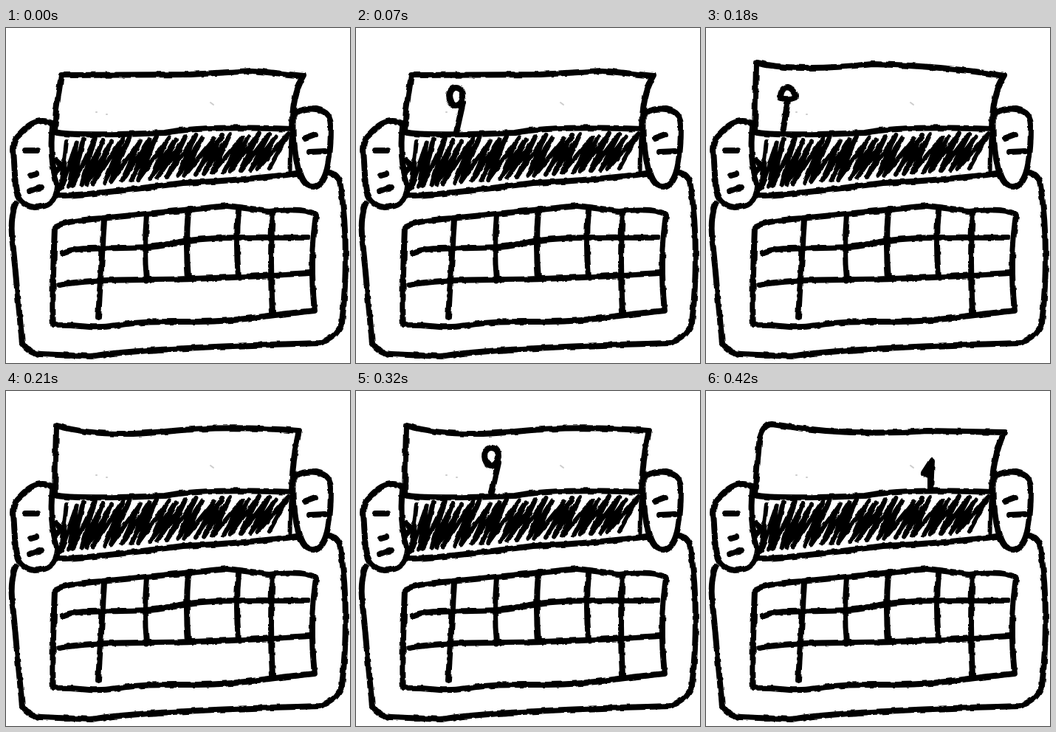
Recreate the animation shown at these times as an HTML page. Size 466 by 454 pixels, loop 490 ms.

```html
<!DOCTYPE html>
<html>
<head>
<meta charset="utf-8">
<title>Typewriter</title>
<style>
  html, body { margin: 0; height: 100%; overflow: hidden; background: #fff; }
  svg { display: block; width: 466px; height: 454px; }
  path { fill: none; stroke: #000; stroke-width: 8; stroke-linecap: round; stroke-linejoin: round; }
</style>
</head>
<body>
<svg viewBox="0 0 466 454">
  <filter id="ink" filterUnits="userSpaceOnUse" x="0" y="0" width="466" height="454" color-interpolation-filters="sRGB">
    <feTurbulence type="fractalNoise" baseFrequency=".08" numOctaves="2" seed="4"/>
    <feDisplacementMap in="SourceGraphic" scale="4" xChannelSelector="R" yChannelSelector="G"/>
  </filter>
  <g filter="url(#ink)">
    <!-- body -->
    <path stroke-width="8.5" d="M13 238Q4 262 10 300L22 428Q32 442 48 442L115 445Q180 434 425 427 448 420 455 400 466 300 453 212 450 198 438 196"/>
    <!-- knobs -->
    <path d="M64 130Q42 118 20 142 10 150 10 165L13 215Q16 240 38 243 68 243 70 215 58 175 63 135"/>
    <path d="M390 115C420 103 440 112 440 132S440 213 416 215 388 150 390 115"/>
    <path d="M26 166h17M34 200l7-2M31 221l17-5M405 149l14-5M411 168l21-1M68 180l7 7-8 9"/>
    <!-- roller -->
    <path d="M66 141Q90 147 215 142 270 132 387 137M71 227Q100 228 240 210 330 206 394 197"/>
    <path style="stroke-width: 5" d="M386 140L385 193"/>
    <path id="hatch" style="stroke-width: 6"/>
    <!-- keys -->
    <path d="M64 402Q62 385 66 270 75 262 130 258L300 241 355 248Q410 243 420 254 411 315 418 383C330 392 310 398 260 398S190 397 150 403 100 401 70 403"/>
    <path d="M76 305C100 293 180 303 220 293S320 283 408 284M72 348Q110 341 190 341T412 332"/>
    <path id="columns"/>
    <path id="paper"/>
    <path id="arm"/>
  </g>
  <path style="stroke: #ccc; stroke-width: 2" d="M277 101l4 3M122 114h1M136 117h1"/>
</svg>
<script>
const setPath = (id, d) => document.getElementById(id).setAttribute("d", d);

// scribble that leans further over as it crosses the roller
let scribble = "";
const turns = 25;
for (let i = 0; i < turns; i++) {
  const u = i / (turns - 1);
  const x = 82 + 298 * u + 2 * Math.sin(i * 2.4);
  const lean = 7 + 18 * Math.min(1, u * 5);
  scribble += `${i ? "L" : "M"}${x} ${153 - 9 * u + 3 * Math.sin(i * 1.7)}L${x - lean} ${216 - 26 * u}`;
}
setPath("hatch", scribble);

// the outer two columns run down past the space bar
const columns = [133, 191, 247, 315, 361].map((x, i) => {
  const top = Math.max(248, 272 - x / 10);
  const bottom = i == 0 ? 392 : i == 4 ? 385 : 351 - x * .045;
  return `M${x} ${top}Q${x - 4} ${(top + bottom) / 2} ${i ? x : 125} ${bottom}`;
});
setPath("columns", columns.join(""));

const page = top => `M66 140L${top}Q388 90 387 137`;
const flat = page("68 110 75 64 250 63 335 58 403 65");
const lifted = page("68 47Q120 60 225 49 320 51 404 65");
const straight = page("68 47Q130 64 215 55T397 54");
const curled = page("72 70Q75 45 90 45 190 62 300 54L404 56");

const ring = (x, y) => `M${x} ${y - 12}c-14-1-12 24-1 24s15-23 1-24M${x + 9} ${y + 8}l-9 40`;
const cap = "M101 95Q101 81 111 80 121 84 121 94 112 98 101 95M111 98L104 142";
const flag = "M304 134V115L295 111 306 94Z";

const poses = [
  [flat, ""], [flat, ring(136, 93)], [lifted, cap], [straight, ""],
  [straight, ring(184, 89)], [curled, ""], [curled, flag]
];

function draw() {
  const [paper, arm] = poses[Math.floor(performance.now() % 490 / 70)];
  setPath("paper", paper);
  setPath("arm", arm);
  requestAnimationFrame(draw);
}
draw();
</script>
</body>
</html>
```
